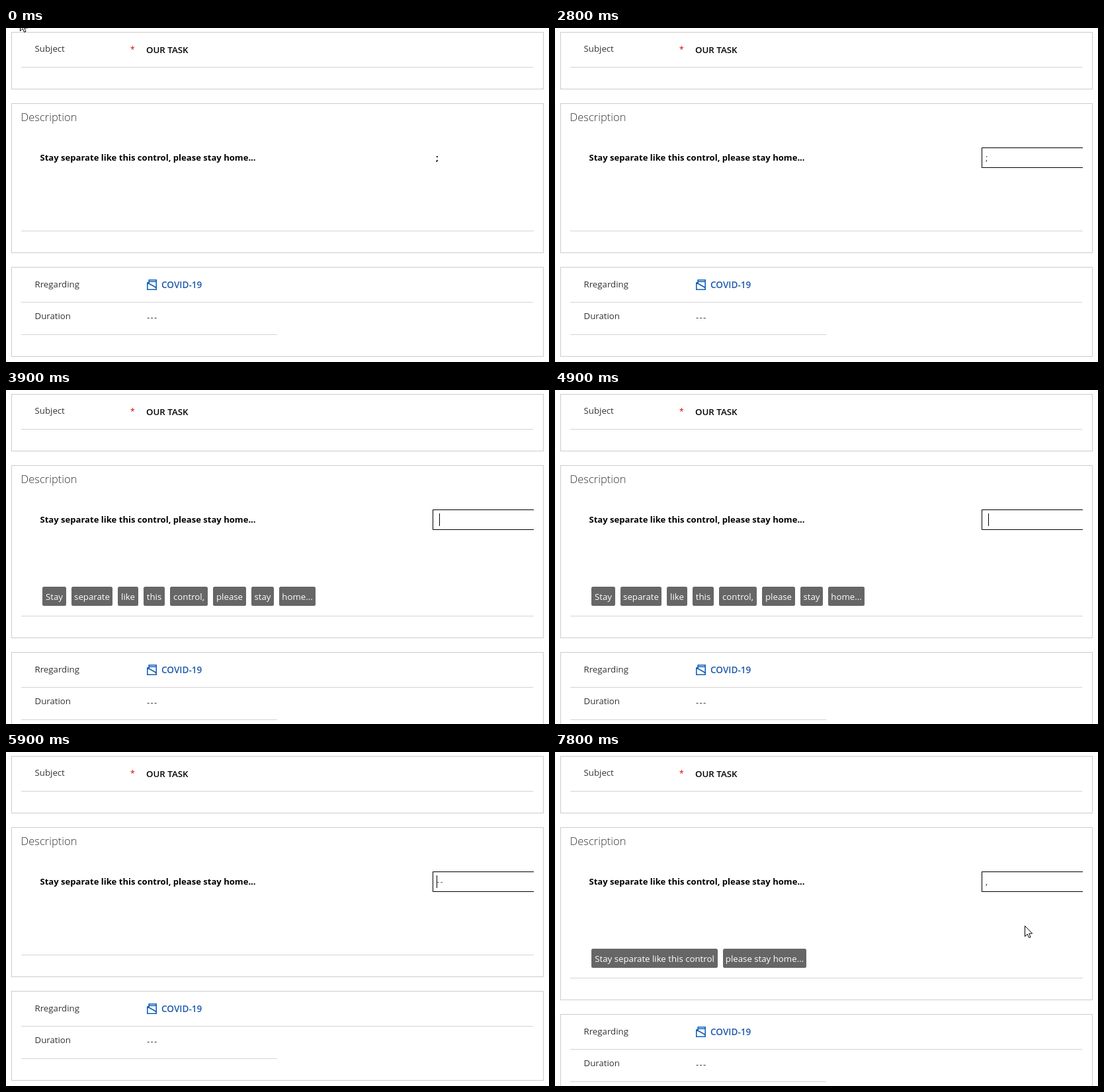
Write an HTML page that moves like this. It is 821 px wide and 506 px high and loops after 8 s.

```html
<!DOCTYPE html>
<html lang="en">
<head>
<meta charset="utf-8">
<title>Task form</title>
<style>
html, body { margin: 0; width: 100%; height: 100%; overflow: hidden; background: #fff; }
svg { display: block; width: 821px; height: 506px; }
text { font: 13.25px "Open Sans", "Noto Sans", sans-serif; fill: #333; white-space: pre; }
.title { font-size: 16.5px; font-weight: 300; }
.value { font-size: 13.3px; font-weight: 600; fill: #000; }
.link { font-size: 13.6px; fill: #1f5bab; }
.bold { font-size: 13.07px; font-weight: 700; fill: #000; }
.dashes { letter-spacing: 1.2px; }
.hint { fill: #666; }
.chip text { fill: #fff; text-anchor: middle; }
.chip rect { fill: #666; }
.panel { fill: none; stroke: #ccc; }
.rule { stroke: #d4d4d4; }
.panel, .rule, .field { shape-rendering: crispEdges; }
.field { fill: none; stroke: #000; }
.icon { fill: none; stroke: #1160b7; stroke-width: 1.6; }
</style>
</head>
<body>
<svg viewBox="0 0 821 506">
  <rect class="panel" x="8.5" y="6.5" width="804" height="86"/>
  <text x="43.5" y="36">Subject</text>
  <text x="188" y="37" style="fill:#e00000;font-size:12px">*</text>
  <text class="value" x="212" y="38">OUR TASK</text>
  <path class="rule" d="M23 59.5H797"/>

  <rect id="body" class="panel" x="8.5" y="114.5" width="804" height="226"/>
  <text class="title" x="22.5" y="141">Description</text>
  <text class="bold" x="51.5" y="201">Stay separate like this control, please stay home...</text>
  <path id="field" class="field" d="M798 181.5H645.5V211.5H798"/>
  <text id="entry" y="201"></text>
  <rect id="caret" y="187" width="1" height="19"/>
  <g id="words" class="chip"></g>
  <g id="parts" class="chip"></g>

  <g id="lower">
    <path class="rule" d="M23 307.5H798"/>
    <rect class="panel" x="8.5" y="362.5" width="804" height="135"/>
    <text x="43.5" y="393">Rregarding</text>
    <path class="icon" d="M213.8 385.5V396.2H227.2V381.8H216.2V385.5H213.8M216.5 384.3H227M214 386L224 391.5L227 393.5"/>
    <text class="value link" x="235" y="394">COVID-19</text>
    <path class="rule" d="M23 415.5H797M23 464.5H410"/>
    <text x="43.5" y="441">Duration</text>
    <text class="dashes" x="213" y="442.5">---</text>
  </g>

  <path id="cursor" d="M.5 .5V16.5L4.2 12.9L6.6 18.3L9 17.3L6.7 12H11.7Z" fill="#fff" stroke="#000"/>
</svg>
<script>
const LOOP = 8000;
const $ = id => document.getElementById(id);

// Each step is [start ms, value]; a value holds until the next step.
const entrySteps = [[0, ";"], [3300, "--"], [3900, " "], [5200, "--"], [6300, ","]];
const chipSteps = [[0, ""], [3900, "words"], [5200, ""], [6300, "parts"]];
const caretSteps = [
  [0, 0], [2200, 654], [2800, 0], [3200, 654], [3300, 651], [3800, 0],
  [3900, 655], [4400, 0], [4900, 655], [5200, 651], [5400, 0], [5900, 651],
  [6300, 654], [6800, 0], [7300, 654], [7800, 0]
];
const cursorSteps = [
  [0, [21, -12]], [100, null], [400, [21, -12]], [500, [381, 344]], [600, null],
  [1800, [803, 245]], [1900, [772, 233]], [2000, [724, 218]], [2100, null],
  [7400, [719, 226]], [7500, [714, 250]], [7600, [710, 263]]
];

const at = (steps, t) => steps.findLast(([start]) => start <= t)[1];
const show = (el, on) => el.setAttribute("visibility", on ? "visible" : "hidden");

function add(parent, name, attrs, label = "") {
  const el = document.createElementNS(parent.namespaceURI, name);
  for (const key in attrs) el.setAttribute(key, attrs[key]);
  el.textContent = label;
  parent.append(el);
}

function addChips(id, chips) {
  let x = 55;
  for (const [label, width] of chips) {
    add($(id), "rect", { x, y: 298, width, height: 29, rx: 2.5 });
    add($(id), "text", { x: x + width / 2, y: 318 }, label);
    x += width + 8;
  }
}

addChips("words", [
  ["Stay", 36], ["separate", 62], ["like", 31], ["this", 32],
  ["control,", 57], ["please", 50], ["stay", 34], ["home...", 55]
]);
addChips("parts", [["Stay separate like this control", 191], ["please stay home...", 126]]);

function draw(now) {
  const t = now % LOOP;
  const focused = t >= 2100;
  const value = at(entrySteps, t);
  const chips = at(chipSteps, t);
  const caret = at(caretSteps, t);
  const cursor = at(cursorSteps, t);

  show($("field"), focused);
  const entry = $("entry");
  entry.textContent = value;
  entry.setAttribute("class", !focused ? "bold" : value === "--" ? "hint dashes" : "");
  entry.setAttribute("x", focused ? 651 : 650);
  show($("caret"), caret);
  $("caret").setAttribute("x", caret);

  show($("words"), chips === "words");
  show($("parts"), chips === "parts");
  const shift = chips ? 35 : 0;
  $("body").setAttribute("height", 226 + shift);
  $("lower").setAttribute("transform", `translate(0 ${shift})`);

  show($("cursor"), cursor);
  if (cursor) $("cursor").setAttribute("transform", `translate(${cursor})`);
  requestAnimationFrame(draw);
}
requestAnimationFrame(draw);
</script>
</body>
</html>
```
